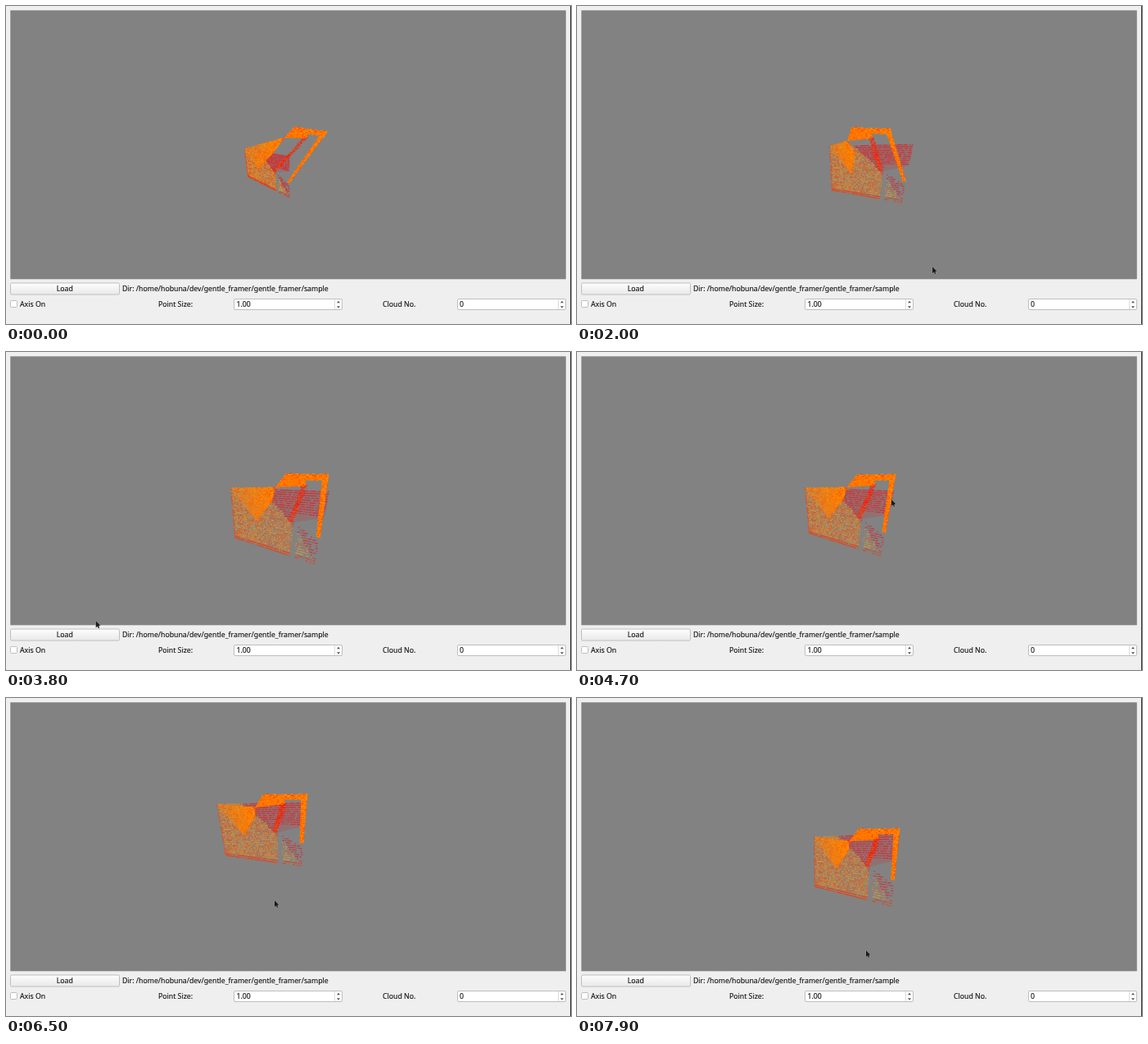
Animation, 690 px wide and 388 px high, one loop 8 s. Source, as an HTML page with a canvas:

```html
<!DOCTYPE html>
<html lang="en">
<head>
<meta charset="utf-8">
<title>Point cloud viewer</title>
<style>
  html, body { margin: 0; width: 100%; height: 100%; overflow: hidden; background: #efefef; }
  canvas, svg { position: absolute; left: 0; top: 0; width: 690px; height: 388px; }
  text { font: 8.72px "Noto Sans", "Open Sans", sans-serif; fill: #111; stroke: #111; stroke-width: .12; }
  .box { fill: #fff; stroke: #bebebe; }
  .line { fill: none; stroke: #dcdcdc; }
  .tick { fill: #555; }
</style>
</head>
<body>
<canvas id="view" width="690" height="388"></canvas>
<svg viewBox="0 0 690 388">
  <defs>
    <linearGradient id="face" x2="0" y2="1">
      <stop stop-color="#fdfdfd"/><stop offset="1" stop-color="#e9e9e9"/>
    </linearGradient>
    <g id="spin">
      <rect class="box" x=".5" y=".5" width="132" height="13" rx="1.5"/>
      <path class="line" d="M123.5 1V13"/>
      <path class="tick" d="M126 5.2h4l-2-2.5zM126 9.2h4l-2 2.5z"/>
    </g>
  </defs>
  <rect x="5.5" y="338" width="133" height="14" rx="1.5" fill="url(#face)" stroke="#bebebe"/>
  <text x="71.8" y="348" text-anchor="middle">Load</text>
  <text x="142" y="348">Dir: /home/hobuna/dev/gentle_framer/gentle_framer/sample</text>
  <rect class="box" x="5.5" y="359.5" width="8" height="8" rx="1"/>
  <text x="17" y="367">Axis On</text>
  <text x="186" y="367">Point Size:</text>
  <use href="#spin" x="278" y="357"/>
  <text x="281.5" y="367">1.00</text>
  <text x="460" y="367">Cloud No.</text>
  <use href="#spin" x="551" y="357"/>
  <text x="554" y="367">0</text>
</svg>
<script>
const LOOP = 8000, STEP = 100, ROWS = 29, COLS = 76;
const ctx = document.getElementById('view').getContext('2d');

// Each view: four corners of the near face (clockwise from top left), then the far beam's ends.
// The cursor bows out by `swing` on its way to the next view.
const views = [
  { at: 0, hold: 200, cursor: [519, 203], swing: [0, -45],
    room: [291,174, 346,184, 346,234, 295,208, 352,148, 392,154] },
  { at: 1400, hold: 0, cursor: [416, 116], swing: [20, 185],
    room: [336,175, 410,167, 402,215, 336,216, 331,150, 369,151] },
  { at: 2800, hold: 200, cursor: [414, 186], swing: [-330, 170],
    room: [265,166, 411,172, 389,278, 272,238, 342,146, 404,150] },
  { at: 4300, hold: 400, cursor: [384, 180], swing: [105, 10],
    room: [278,166, 387,170, 371,249, 283,221, 342,150, 389,150] },
  { at: 5500, hold: 0, cursor: [347, 61], swing: [100, 195],
    room: [273,104, 376,94, 364,186, 279,167, 328,121, 386,116] },
  { at: 6500, hold: 0, cursor: [328, 247], swing: [110, -170],
    room: [257,130, 367,128, 361,205, 268,192, 314,118, 368,118] },
  { at: 7900, hold: 100, cursor: [353, 308], swing: [0, 0],
    room: [289,170, 394,166, 384,254, 290,230, 344,160, 394,160] },
];

const LIT = ['#e8481c', '#f07010', '#d8a038', '#f25a0c', '#c8a048', '#f08418', ''];
const DARK = ['#e0242a', '#d82830', '#e81c14', '#cc3038', ''];
const ORANGE = ['#ff8c00', '#ff6000', '#ff7c00', '#ff9800', '#ff4000'];
const RED = ['#ff1c00', '#ff2e00', '#ff4400', '#f01408', ''];

const mix = (a, b, k) => a.map((v, i) => v + (b[i] - v) * k);
const noise = (a, b, c) => {
  const s = Math.sin(a * 12.99 + b * 78.23 + c * 37.72) * 43758.545;
  return s - Math.floor(s);
};
const pick = (colors, r) => colors[Math.floor(r * colors.length)];

function trace(points) {
  ctx.beginPath();
  points.forEach(p => ctx.lineTo(p[0], p[1]));
  ctx.closePath();
}

function fill(points, color) {
  trace(points);
  ctx.fillStyle = color;
  ctx.fill();
}

// Scan rows across a four-cornered patch; paint(u, v, r) gives a colour or nothing.
function scan([a, b, c, d], rows, cols, paint, jitter = 0) {
  for (let j = 0; j <= rows; j++) {
    const v = j / rows, from = mix(a, d, v), to = mix(b, c, v);
    const w = Math.max(1, Math.abs(to[0] - from[0]) / cols + 0.2);
    for (let i = 0; i < cols; i++) {
      const u = i / cols, color = paint(u, v, noise(i, j, rows));
      if (!color) continue;
      const [x, y] = mix(from, to, u);
      ctx.fillStyle = color;
      ctx.fillRect(x, y - 0.5 + (noise(j, i, 5) - 0.5) * jitter, w, 1);
    }
  }
}

// Near face: lit below a diagonal, dark above it, with a slit and a torn corner.
function paintFace(u, v, r) {
  const lit = u < 0.28 + 0.72 * v;
  if (v > 0.5 && u > 0.68 && u < 0.73) return '';
  if (u > 0.68 && v > 0.37 && v < 0.5 + (u - 0.68) * 0.7) return '';
  if (u > 0.7 && v > 0.5 && r < 0.25) return '';
  if (v > 0.94 || u < 0.012) return r < 0.8 ? '#f0380e' : '';
  return pick(lit ? LIT : DARK, r);
}

function drawRoom(flat) {
  const [A, E, D, B, G, H] = [0, 2, 4, 6, 8, 10].map(i => flat.slice(i, i + 2));
  const face = (u, v) => mix(mix(A, E, u), mix(B, D, u), v);
  const F = mix(G, B, 0.21);
  const P = mix(G, H, 0.42), N = mix(P, D, 0.13);
  const S = face(0.66, 0.5);

  fill([face(0.28, 0), E, face(1, 0.36), S], 'rgba(190,50,58,.22)');
  fill([A, face(0.28, 0), S, face(0.69, 1), B], 'rgba(225,125,40,.22)');
  scan([A, E, D, B], ROWS, COLS, paintFace);

  // left wall, denser towards the far end
  const R = mix(F, face(0.4, 0.4), 0.5);
  const wall = [A, F, R, face(0.27, 0.57)];
  const glow = ctx.createLinearGradient(...A, ...R);
  glow.addColorStop(0, 'rgba(240,130,20,.2)');
  glow.addColorStop(1, 'rgba(255,122,0,.9)');
  fill(wall, glow);
  scan(wall, 22, 36, (u, v, r) => r < 0.35 + u * 0.4 ? pick(ORANGE, r * 1.25) : '');

  // far block and beam, then the right wall seen edge-on
  const block = [F, G, P, N];
  const beam = [G, H, mix(H, D, 0.06), mix(P, D, 0.06)];
  const side = [mix(G, H, 0.86), H, face(1, 0.64), face(0.955, 0.63)];
  const solid = (u, v, r) => pick(ORANGE, r);
  for (const part of [block, beam, side]) {
    fill(part, '#ff7600');
    scan(part, part === side ? 36 : 9, part === side ? 5 : 24, solid, 2);
  }

  // inner post
  const post = [mix(N, F, 0.14), mix(N, H, 0.1), mix(S, E, 0.03), mix(S, A, 0.05)];
  scan(post, 32, 7, (u, v, r) => pick(RED, r), 3);
}

function drawCursor([x, y]) {
  const arrow = [[0, 0], [0, 8], [1.8, 6.3], [3, 8.8], [4.2, 8.2], [3.1, 5.8], [5.4, 5.5]];
  trace(arrow.map(q => [x + q[0], y + q[1]]));
  ctx.lineWidth = 0.7;
  ctx.strokeStyle = '#aaa';
  ctx.stroke();
  ctx.fillStyle = '#1a1a1a';
  ctx.fill();
}

function draw(t) {
  ctx.fillStyle = '#efefef';
  ctx.fillRect(0, 0, 690, 388);
  ctx.fillStyle = '#333';
  ctx.fillRect(689, 0, 1, 388);
  ctx.fillStyle = '#828282';
  ctx.fillRect(5.3, 5.3, 678.5, 328);

  const i = views.findLastIndex(v => v.at <= t);
  const a = views[i], b = views[i + 1] || a;
  const part = Math.max(0, (t - a.at - a.hold) / (b.at - a.at - a.hold || 1));
  const k = b === a ? 0 : part * part * (3 - 2 * part);
  drawRoom(mix(a.room, b.room, k));
  if (t < 200) return;
  const bow = Math.sin(Math.PI * k);
  drawCursor(mix(a.cursor, b.cursor, k).map((v, n) => v + a.swing[n] * bow));
}

let last = -1;
const start = performance.now();
function tick() {
  const t = Math.floor(((performance.now() - start) % LOOP) / STEP) * STEP;
  if (t !== last) draw(last = t);
  requestAnimationFrame(tick);
}
tick();
</script>
</body>
</html>
```
